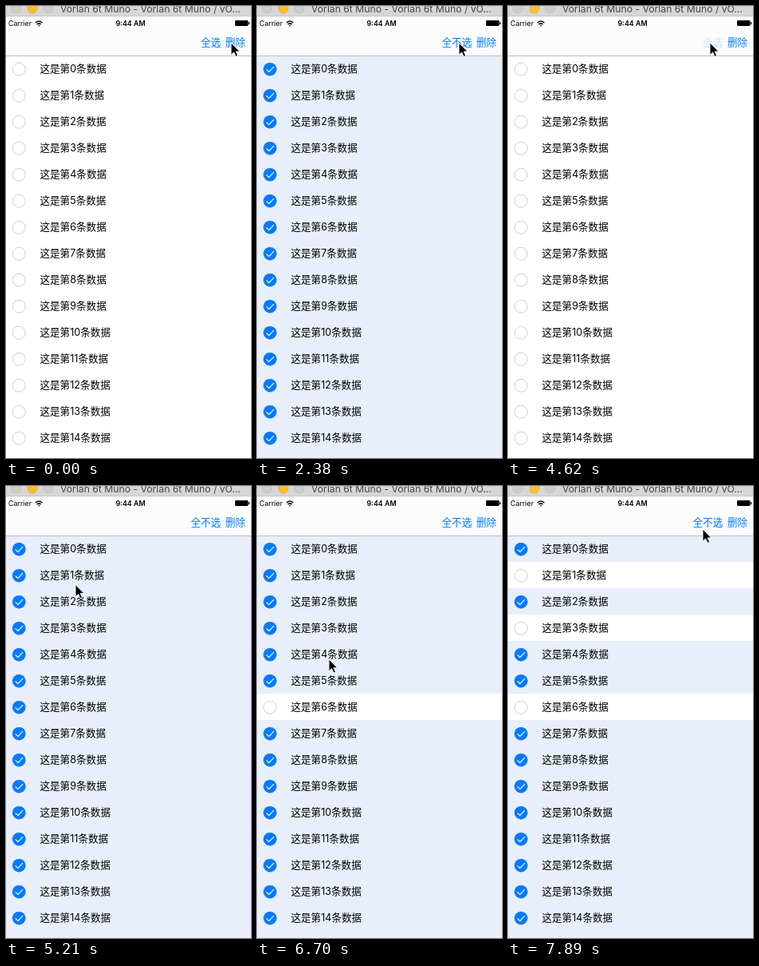
Animation, 307 px wide and 566 px high, one loop 8 s. Source, as an HTML page:

```html
<!DOCTYPE html>
<html lang="zh-CN">
<head>
<meta charset="utf-8">
<title>List selection</title>
<style>
  html, body { margin: 0; width: 100%; height: 100%; overflow: hidden; background: #fff; }
  svg { display: block; width: 307px; height: 566px; }
  text { font: 12.6px Inter, "Noto Sans CJK SC", "Noto Sans CJK", sans-serif; }
  .status { font-size: 8.9px; }
  .blue { fill: #007aff; }
  .line { fill: none; stroke-linecap: round; stroke-linejoin: round; }
</style>
</head>
<body>
<svg viewBox="0 0 307 566">
  <rect width="307" height="566" fill="#fff"/>
  <g id="rows"></g>

  <rect y="13" width="307" height="49" fill="#fcfcfc"/>
  <rect y="62" width="307" height="1" fill="#bcbdc0"/>
  <text id="toggle" class="blue" x="269.3" y="50.2" text-anchor="end"></text>
  <text class="blue" x="275" y="50.2">删除</text>

  <text class="status" x="3" y="25">Carrier</text>
  <g class="line" stroke="#000" stroke-width="1.4">
    <path d="M37.4 20.6Q41.2 17.4 45 20.6M39.1 22.6Q41.2 20.8 43.3 22.6"/>
    <path d="M41.2 24.4v.1" stroke-width="1.7"/>
  </g>
  <text class="status" x="156" y="25" text-anchor="middle" font-weight="600" style="font-weight:600">9:44 AM</text>
  <rect x="287" y="18" width="16.5" height="7" rx="1.2"/>
  <rect x="304" y="20" width="1.2" height="3" rx=".6"/>

  <rect width="307" height="13" fill="#d6d6d6"/>
  <rect y="12.5" width="307" height=".7" fill="#bdbdbd"/>
  <g stroke-width=".7">
    <circle cx="12.5" cy="3" r="6" fill="#cdcdcd" stroke="#b9b9b9"/>
    <circle cx="33" cy="3" r="6" fill="#fdbd2e" stroke="#e0a32a"/>
    <circle cx="53" cy="3" r="6" fill="#cdcdcd" stroke="#b9b9b9"/>
  </g>
  <text x="68" y="8" fill="#444" style="font-size:12.2px">Vorlan 6t Muno - Vorlan 6t Muno / vO...</text>

  <path id="cursor" d="M0 0V15.4L3.6 12L6 17.4L8.6 16.3L6.3 11H11Z" stroke="#fff" stroke-width="1" stroke-linejoin="round"/>
</svg>
<script>
const LOOP = 8000, TICK = 148.7; // the screen refreshes once per tick
const $ = id => document.getElementById(id);

$('rows').innerHTML = Array.from({ length: 16 }, (_, i) => `
  <g transform="translate(0 ${62 + 33 * i})">
    <rect class="back" width="307" height="33" fill="#e8effa"/>
    <circle class="ring" cx="16.3" cy="17.2" r="8" fill="#fff" stroke="#c9c9cd" stroke-width=".9"/>
    <g class="tick">
      <circle class="blue" cx="16.3" cy="17.2" r="8.3"/>
      <path class="line" d="M12 17.6l3 3l5.8-6.2" stroke="#fff" stroke-width="1.1"/>
    </g>
    <text x="42.4" y="21.4">这是第${i}条数据</text>
  </g>`).join('');

const rows = [...$('rows').children].map(row => ({
  back: row.querySelector('.back'),
  tick: row.querySelector('.tick')
}));

// tick, x, y
const path = [
  [0, 282, 46], [7, 282, 46], [11, 253, 46], [32, 253, 46], [35, 87, 123.5],
  [38, 87, 123.5], [41, 84, 310], [43, 87, 261.5], [44, 87, 261.5], [46, 93, 172],
  [47, 93, 172], [48, 95, 155.5], [50, 100, 108], [51, 115, 100], [53, 244, 54]
];
// press and release ticks of the toggle button
const clicks = [[12, 13], [21, 22], [31, 32]];
// row: tick at which it is deselected by hand
const deselected = { 6: 44, 3: 48, 1: 51 };

const clamp = v => Math.max(0, Math.min(1, v));

function cursorAt(k) {
  const n = path.findIndex(p => p[0] >= k);
  if (n < 1) return path[n < 0 ? path.length - 1 : 0].slice(1);
  const [a, b] = [path[n - 1], path[n]];
  const u = (k - a[0]) / (b[0] - a[0]);
  return [1, 2].map(c => a[c] + (b[c] - a[c]) * u);
}

function draw(k) {
  let level = 0, selected = false, alpha = 1;
  for (const [press, release] of clicks) {
    if (k < press) break;
    alpha = 0.2;
    if (k < release) break;
    const fade = clamp((k - release + 1) / 3);
    selected = !selected;
    level = selected ? fade : 1 - fade;
    alpha = 0.2 + 0.8 * fade;
  }
  $('toggle').textContent = selected ? '全不选' : '全选';
  $('toggle').setAttribute('opacity', alpha);
  rows.forEach(({ back, tick }, i) => {
    const off = k >= deselected[i];
    back.setAttribute('opacity', off ? 0 : level);
    tick.setAttribute('opacity', selected && !off ? 1 : 0);
  });
  $('cursor').setAttribute('transform', `translate(${cursorAt(k)})`);
}

function frame() {
  draw(Math.floor(performance.now() % LOOP / TICK));
  requestAnimationFrame(frame);
}
frame();
</script>
</body>
</html>
```
